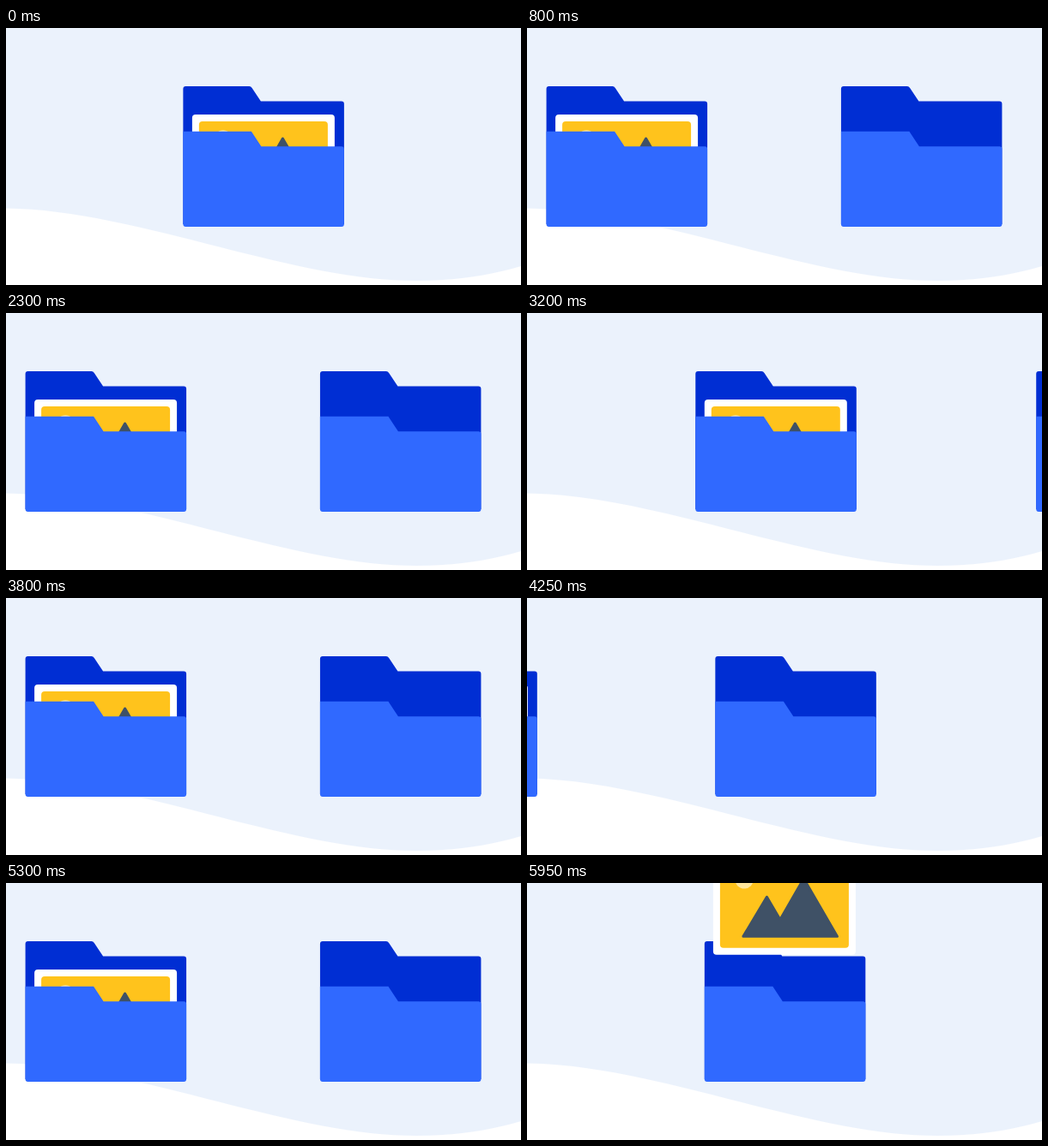
These frames come from a looping animation (600x300 px, 6000 ms). An HTML page:

```html
<!DOCTYPE html>
<html lang="en">
<head>
<meta charset="utf-8">
<title>Folders</title>
<style>
  html, body { margin: 0; width: 100%; height: 100%; overflow: hidden; }
  svg { display: block; }
</style>
</head>
<body>
<svg width="600" height="300" viewBox="0 0 600 300">
  <defs>
    <path id="back" fill="#002ed3" d="M0 71q0-3 3-3H77q2 0 3.200 2L90.500 85.500H184.500q3 0 3 3V229H0z"/>
    <path id="front" fill="#3069ff" d="M0 120.800H79.500L91 138.300H184.500q3 0 3 3V229q0 3-3 3H3q-3 0-3-3z"/>
  </defs>
  <rect width="600" height="300" fill="#ebf2fc"/>
  <path fill="#fff" d="M0 210.500C150 212 330 295 478 295C520 295 560 290 600 278V300H0z"/>
  <use id="oldBack" href="#back"/>
  <use id="newBack" href="#back"/>
  <g id="photo">
    <rect x="10.500" y="101" width="166" height="117" rx="4" fill="#fff"/>
    <rect x="18.500" y="109" width="150" height="101" rx="4" fill="#ffc31c"/>
    <circle cx="46.700" cy="130" r="10.700" fill="#ffe69c"/>
    <path d="M45.500 196.500L73 150.500L88.500 177L116 129L155 196.500z"
      fill="#3f5166" stroke="#3f5166" stroke-width="3" stroke-linejoin="round"/>
  </g>
  <use id="oldFront" href="#front"/>
  <use id="newFront" href="#front"/>
</svg>
<script>
const CYCLE = 1500, CENTER = 206.4, SPACING = 400;
const DROP_START = 1300, DROP_HEIGHT = 218, BOUNCE = 200;
const get = id => document.getElementById(id);
const move = (id, x, y) => get(id).setAttribute('transform', `translate(${x} ${y})`);

function bezier(x1, y1, x2, y2) {
  const at = (a, b, s) => 3 * a * s * (1 - s) ** 2 + 3 * b * s * s * (1 - s) + s ** 3;
  return x => {
    let lo = 0, hi = 1;
    for (let i = 0; i < 30; i++) {
      const mid = (lo + hi) / 2;
      if (at(x1, x2, mid) < x) lo = mid; else hi = mid;
    }
    return at(y1, y2, lo);
  };
}
const leave = bezier(0.66, 0.05, 0.5, 1);
const enter = bezier(0.565, 0.05, 0.427, 1);

function draw(time) {
  const t = time % CYCLE, p = t / CYCLE;
  const oldX = CENTER - SPACING * leave(p);
  const newX = CENTER + SPACING * (1 - enter(p));
  // The landing photo knocks its folder down for a moment
  const dip = t < BOUNCE ? 6 * (1 - Math.cos(2 * Math.PI * t / BOUNCE)) : 0;

  move('oldBack', oldX, dip);
  move('oldFront', oldX, dip);
  move('newBack', newX, 0);
  move('newFront', newX, 0);

  // Until the next drop the photo travels with the leaving folder
  if (t < DROP_START && oldX > -200 && p < 0.86) {
    move('photo', oldX, dip);
  } else {
    const fall = Math.max(0, (t - DROP_START) / (CYCLE - DROP_START)) ** 3.4;
    move('photo', CENTER, DROP_HEIGHT * (fall - 1));
  }
}

const start = performance.now();
function frame() {
  draw(performance.now() - start);
  requestAnimationFrame(frame);
}
draw(0);
requestAnimationFrame(frame);
</script>
</body>
</html>
```
